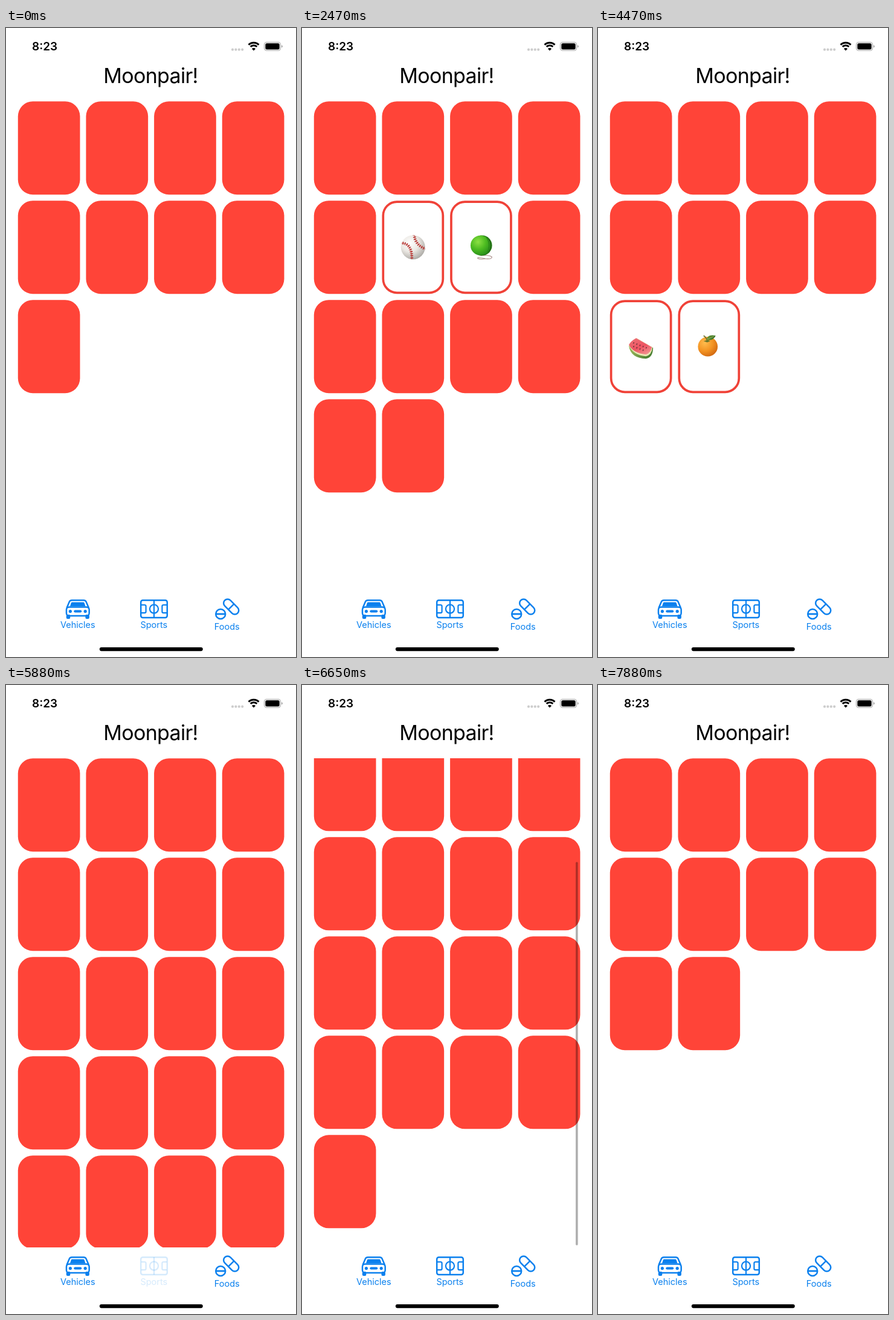
Animation of 480x1039 px, one loop 8000 ms. Source, as an HTML page with a canvas:

```html
<!DOCTYPE html>
<html lang="en">
<head>
<meta charset="utf-8">
<title>Moonpair!</title>
<style>
  html, body { margin: 0; width: 100%; height: 100%; overflow: hidden; background: #fff; }
  canvas { display: block; width: 480px; height: 1039px; }
</style>
</head>
<body>
<canvas id="stage"></canvas>
<script>
const W = 480, H = 1039, LOOP = 8000, FPS = 17;
const RED = '#ff4438', EDGE = '#f04238', BLUE = '#0a80ee';
const VIEW = { top: 121, bottom: 929 }, PITCH = 164, MAX_SCROLL = 166;
const PRESSED = 0.17;

const canvas = document.getElementById('stage');
const ctx = canvas.getContext('2d');
const ratio = window.devicePixelRatio || 1;
canvas.width = W * ratio;
canvas.height = H * ratio;

// ---- drawing helpers ----
function paint(fill, stroke, width) {
  if (fill) { ctx.fillStyle = fill; ctx.fill(); }
  if (stroke) { ctx.strokeStyle = stroke; ctx.lineWidth = width; ctx.stroke(); }
}
function rect(x, y, w, h, r, fill, stroke, width) {
  ctx.beginPath();
  ctx.roundRect(x, y, w, h, r);
  paint(fill, stroke, width);
}
function disc(x, y, r, fill, stroke, width) {
  ctx.beginPath();
  ctx.arc(x, y, r, 0, Math.PI * 2);
  paint(fill, stroke, width);
}
function shape(d, fill, stroke, width) {
  const path = new Path2D(d);
  if (fill) { ctx.fillStyle = fill; ctx.fill(path); }
  if (stroke) { ctx.strokeStyle = stroke; ctx.lineWidth = width; ctx.stroke(path); }
}
function text(str, x, y, font, color, align = 'center', spacing = 0) {
  ctx.font = `${font} Inter, Roboto, sans-serif`;
  ctx.letterSpacing = `${spacing}px`;
  ctx.textAlign = align;
  ctx.fillStyle = color;
  ctx.fillText(str, x, y);
}
function ramp(x0, y0, x1, y1, ...colors) {
  const g = ctx.createLinearGradient(x0, y0, x1, y1);
  colors.forEach((c, i) => g.addColorStop(i / (colors.length - 1), c));
  return g;
}
function glow(x, y, r, ...colors) {
  const g = ctx.createRadialGradient(x, y, 0, x, y, r);
  colors.forEach((c, i) => g.addColorStop(i / (colors.length - 1), c));
  return g;
}
function wheel(x, y, r) {
  disc(x, y, r, '#3b3b3d');
  disc(x, y, r * 0.58, '#c9cbcc');
  disc(x, y, r * 0.22, '#77797b');
}

// ---- card faces, centred on the origin ----
const faces = {
  bus() {
    rect(-15, -19, 28, 4, 2, '#eee2b5');
    shape('M-19-17H18Q20-17 20-14L21 12Q21 15 18 15H-18Q-21 15-21 12V0Z',
      ramp(0, -17, 0, 15, '#fff0a8', '#ffd83d', '#f4ad16'));
    shape('M-21 3H21V12Q21 15 18 15H-18Q-21 15-21 12Z', '#f3a91b');
    rect(-21, 8, 42, 7, 2, '#55585b');
    shape('M-17-13H-11V1H-19Z', ramp(0, -13, 0, 1, '#549cc4', '#b9e4f4'), '#696550', 1);
    for (let i = 0; i < 3; i++) {
      rect(-8 + i * 8.5, -13, 7.5, 11, 1, ramp(0, -13, 0, -2, '#5d9ebd', '#b4dfec'), '#6a6658', 0.8);
    }
    rect(17, -13, 2, 11, 1, '#679dae');
    rect(-20, 4, 4, 3, 1, '#fff5c9');
    wheel(-12, 14, 5.2);
    wheel(12, 14, 5.2);
  },
  car() {
    shape('M12-11L15-15', null, '#555', 1);
    shape('M-21 3Q-19-1-11-2Q-6-12 1-14Q11-15 16-10Q20-3 21 3V11Q20 15 16 15H-17Q-21 15-21 10Z',
      ramp(0, -14, 0, 16, '#f34a40', '#e51b22', '#a90d15'));
    shape('M-9-2Q-4-11 2-11H4V-2Z', '#9cc5d5', '#51343a', 1);
    shape('M6-11H10Q14-10 15-3L6-2Z', '#79a9bd', '#51343a', 1);
    shape('M5-11V11M6 1H10', null, '#a3131b', 1);
    shape('M-20 4Q-14 1-12 4L-16 6Z', '#f7eed9');
    rect(-21, 9, 9, 3, 1, '#6e2022');
    wheel(-11, 13, 5.8);
    wheel(14, 12, 5.6);
  },
  baseball() {
    disc(0, 0, 20, glow(-5, -7, 29, '#fff', '#ebe8e3', '#aaa8a3'));
    ctx.save();
    ctx.beginPath();
    ctx.arc(0, 0, 20, 0, Math.PI * 2);
    ctx.clip();
    const seams = ['M-21-7Q-1-8-2 21', 'M2-21Q3-4 21 3'];
    for (const seam of seams) {
      shape(seam, null, '#b93b36', 0.9);
      ctx.setLineDash([1.5, 2]);
      shape(seam, null, '#b7312f', 4.8);
      ctx.setLineDash([]);
    }
    ctx.restore();
  },
  yoyo() {
    shape('M-1 14Q13 12 18 16Q18 20 8 19Q-6 16-6 18Q-3 21 7 19', null, '#aa8e89', 1.1);
    disc(1.5, -3, 16.7, '#267916');
    disc(-1, -3, 16.4, glow(-5, -9, 25, '#8de044', '#4dbc21', '#24881a'));
    shape('M9-16Q17-5 10 10', null, '#298317', 1.2);
    shape('M13-14Q19-4 13 9', null, '#1e6214', 1);
  },
  orange() {
    disc(-2, 0, 16.3, glow(-7, -6, 27, '#ffbc4e', '#f39322', '#c85d0c'));
    shape('M-3-9Q-4-15-9-18', null, '#69712c', 1.7);
    shape('M-4-11Q-3-21 11-18Q7-9-4-11Z', ramp(-4, -18, 9, -10, '#709b38', '#316d25'));
    shape('M-3-12L8-17', null, '#a5bd69', 0.8);
    shape('M-9-9L-3-7L2-9L-2-11Z', '#68762b');
  },
  melon() {
    shape('M-20-1Q-17 19 8 20Q20 18 20 2L-7-13Z', ramp(-10, 5, 10, 19, '#8dae54', '#4b8132'));
    shape('M-20-2Q-13 14 8 16Q18 14 19 1L-7-14Z', '#e9e6b4');
    shape('M-20-3Q-13 11 8 13Q16 11 18 1L-8-14Q-17-9-20-3Z',
      ramp(-6, -12, 5, 13, '#ed6970', '#ed5361', '#f28b8b'));
    for (let i = 0; i < 9; i++) {
      const x = -12 + (i % 5) * 5.2, y = -6 + (i % 5) * 2 + Math.floor(i / 5) * 6;
      ctx.beginPath();
      ctx.ellipse(x, y, 0.8, 1.4, 0.5, 0, Math.PI * 2);
      paint('#633036');
    }
  }
};

// ---- timeline, counted in ticks of 1/17 s ----
const decks = [
  { from: 0, count: 9 },
  { from: 30, count: 14 },
  { from: 65, count: 10 },
  { from: 100, count: 21 },
  { from: 121, count: 10 }
];
const flips = [
  { card: 5, face: 'bus', from: 13, to: 30 },
  { card: 6, face: 'car', from: 18, to: 30 },
  { card: 5, face: 'baseball', from: 39, to: 56 },
  { card: 6, face: 'yoyo', from: 42, to: 53 },
  { card: 9, face: 'orange', from: 72, to: 90 },
  { card: 8, face: 'melon', from: 76, to: 94 }
];
const taps = [
  { tab: 'Sports', down: 28, up: 30 },
  { tab: 'Foods', down: 63, up: 65 },
  { tab: 'Sports', down: 100, up: 100 },
  { tab: 'Foods', down: 120, up: 121 }
];

function tabAlpha(tab, tick) {
  const tap = taps.find(p => p.tab === tab && tick >= p.down && tick < p.up + 4);
  return tap ? PRESSED + (1 - PRESSED) * Math.max(0, tick - tap.up) / 4 : 1;
}

// A flick past the end, then a damped return to it.
function scrollAt(tick) {
  const ms = tick * 1000 / FPS;
  if (tick < 109 || tick >= 121) return 0;
  if (ms < 6610) return 200 * Math.sin((ms - 6370) / 240 * Math.PI / 2);
  const k = (ms - 6610) * 0.011;
  return MAX_SCROLL + 34 * (1 + k) * Math.exp(-k);
}

// ---- scene ----
function drawCards(tick, scroll) {
  const deck = decks.filter(d => tick >= d.from).pop();
  ctx.save();
  ctx.beginPath();
  ctx.rect(0, VIEW.top, W, VIEW.bottom - VIEW.top);
  ctx.clip();
  for (let i = 0; i < deck.count; i++) {
    const x = 19.8 + (i % 4) * 112.65;
    const y = VIEW.top + 0.2 + Math.floor(i / 4) * PITCH - scroll;
    const flip = flips.find(f => f.card === i && tick >= f.from && tick < f.to);
    if (!flip) {
      rect(x, y, 102.7, 154, 24.6, RED);
      continue;
    }
    rect(x + 1.85, y + 1.85, 99, 150.3, 22.8, '#fff', EDGE, 3.7);
    ctx.save();
    ctx.translate(x + 51.3, y + 77);
    faces[flip.face]();
    ctx.restore();
  }
  ctx.restore();
}

function drawScrollBar(tick, scroll) {
  if (tick < 109 || tick >= 134) return;
  const fade = tick >= 132 ? (134 - tick) / 3 : 1;
  const over = Math.max(0, scroll - MAX_SCROLL);
  const length = tick >= 121 ? 476 : 665 - over;
  const top = tick >= 121 ? 450 : over ? 925.5 - length : 124 + scroll / MAX_SCROLL * 136.5;
  rect(453, top, 3.7, length, 1.85, `rgba(0,0,0,${0.31 * fade})`);
}

function drawStatus() {
  text('8:23', 43, 37.3, '600 19px', '#000', 'left');
  for (let i = 0; i < 4; i++) disc(375 + i * 5.4, 35.7, 2.1, '#cdcdcd');
  const arc = r => {
    ctx.beginPath();
    ctx.arc(410, 36.2, r, -Math.PI * 0.75, -Math.PI * 0.25);
    paint(null, '#000', 2.9);
  };
  arc(12);
  arc(7.5);
  shape('M410 37.4L406.9 34.2Q410 31.6 413.1 34.2Z', '#000');
  rect(427.5, 23.5, 27, 13.7, 4, null, '#a4a4a4', 1.1);
  rect(429.3, 25.3, 23.4, 10.1, 2.5, '#000');
  shape('M456 28.2Q457.8 28.8 457.8 30.4Q457.8 32 456 32.6Z', '#a4a4a4');
}

const tabs = [
  { name: 'Vehicles', x: 118.8, base: 991.3, icon() {
    shape('M100.5 958L105 947.5Q106 945.2 109 945.2H128.5Q131.5 945.2 132.5 947.5L137 958', null, BLUE, 2.5);
    rect(100, 956.4, 37.7, 14.6, 4.5, null, BLUE, 2.5);
    shape('M109.5 948.6H128Q129.3 948.6 129.8 950L131.5 955.2H106L107.7 950Q108.2 948.6 109.5 948.6Z', BLUE);
    disc(106.4, 963.6, 2.6, BLUE);
    disc(131.2, 963.6, 2.6, BLUE);
    rect(112.3, 961.4, 13, 4.2, 2.1, BLUE);
    rect(99.8, 969, 6.5, 7, 2, BLUE);
    rect(131.4, 969, 6.5, 7, 2, BLUE);
  } },
  { name: 'Sports', x: 244.8, base: 991.3, icon() {
    rect(223.2, 945.2, 43.6, 28.8, 3.2, null, BLUE, 2.5);
    shape('M245 945V974M224 953H229.4Q231.6 953 231.6 955.2V964Q231.6 966.2 229.4 966.2H224' +
      'M266 953H260.6Q258.4 953 258.4 955.2V964Q258.4 966.2 260.6 966.2H266', null, BLUE, 2.2);
    disc(245, 959.6, 7.1, null, BLUE, 2.2);
  } },
  { name: 'Foods', x: 365.8, base: 993.6, icon() {
    ctx.save();
    ctx.translate(372.7, 956);
    ctx.rotate(Math.PI / 4);
    rect(-15, -6.6, 30, 13.2, 6.6, null, BLUE, 2.5);
    shape('M0-6.6V6.6', null, BLUE, 2.4);
    ctx.restore();
    disc(355.2, 968, 8, null, BLUE, 2.5);
    shape('M347.5 968H363', null, BLUE, 2.8);
  } }
];

function drawTabs(tick) {
  for (const tab of tabs) {
    ctx.globalAlpha = tabAlpha(tab.name, tick);
    tab.icon();
    text(tab.name, tab.x, tab.base, '400 14.5px', BLUE);
  }
  ctx.globalAlpha = 1;
}

function draw(tick) {
  ctx.setTransform(ratio, 0, 0, ratio, 0, 0);
  ctx.fillStyle = '#fff';
  ctx.fillRect(0, 0, W, H);
  const scroll = scrollAt(tick);
  drawStatus();
  text('Moonpair!', 239.5, 91, '400 34px', '#000', 'center', -0.7);
  drawCards(tick, scroll);
  drawScrollBar(tick, scroll);
  drawTabs(tick);
  rect(154.8, 1023, 171, 6.2, 3.1, '#000');
}

const start = performance.now();
function loop() {
  const ms = (performance.now() - start) % LOOP;
  draw(Math.floor((ms + 5) * FPS / 1000) % (LOOP * FPS / 1000));
  requestAnimationFrame(loop);
}
loop();
</script>
</body>
</html>
```
